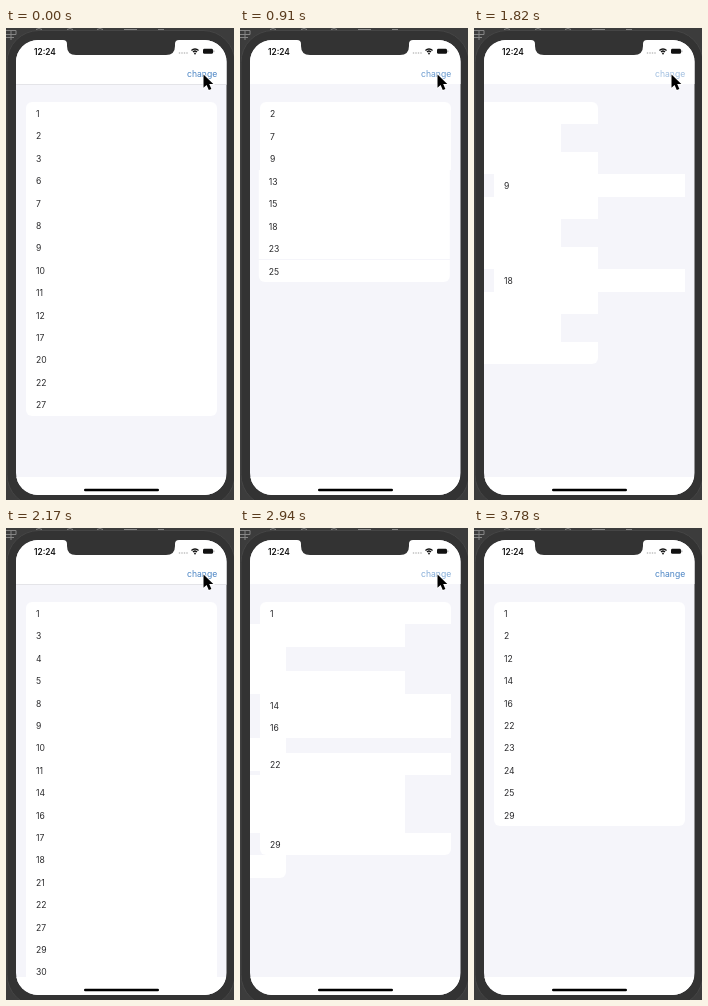
An HTML page with a canvas for the animation above (3850 ms loop, 228 by 472 pixels).

```html
<!DOCTYPE html>
<html lang="en">
<head>
<meta charset="utf-8">
<title>List changes</title>
<style>
html, body { margin: 0; width: 100%; height: 100%; overflow: hidden; background: #3c3c3c; }
canvas { display: block; }
</style>
</head>
<body>
<canvas id="stage" width="228" height="472"></canvas>
<script>
const ctx = document.getElementById('stage').getContext('2d');
const LOOP = 3850, STEP = 70, ROW = 22.4, TOP = 74, SLIDE = 211;
const FONT = '8.6px Inter, sans-serif';

const lists = [
  [1, 2, 3, 6, 7, 8, 9, 10, 11, 12, 17, 20, 22, 27],
  [2, 7, 9, 13, 15, 18, 23, 25],
  [1, 3, 4, 5, 8, 9, 10, 11, 14, 16, 17, 18, 21, 22, 27, 29, 30],
  [1, 2, 12, 14, 16, 22, 23, 24, 25, 29],
];
const clicks = [
  { press: 350, release: 630 },
  { press: 1470, release: 1680 },
  { press: 2450, release: 2730 },
];

const clamp = v => Math.min(1, Math.max(0, v));
const smooth = u => u * u * (3 - 2 * u);
const mix = (a, b, p) => a + (b - a) * p;

// Rows of a run, each paired with its place in the matching run of the other list.
const spread = (list, start, end, otherStart, otherEnd) =>
  list.slice(start, end).map((n, k) => ({
    n, list, own: start + k,
    other: otherStart + k / Math.max(1, end - start - 1) * Math.max(0, otherEnd - otherStart - 1),
  }));

function plan(before, after) {
  const added = [], removed = [], kept = [];
  let i = 0, j = 0;
  for (const n of [...before.filter(v => after.includes(v)), null]) {
    const a = n === null ? before.length : before.indexOf(n);
    const b = n === null ? after.length : after.indexOf(n);
    removed.push(...spread(before, i, a, j, b));
    added.push(...spread(after, j, b, i, a));
    if (n !== null) kept.push({ n, list: after, own: b, other: a });
    i = a + 1;
    j = b + 1;
  }
  return { added, removed, kept };
}
const plans = clicks.map((_, k) => plan(lists[k], lists[k + 1]));

function box(x, y, w, h, r, fill) {
  ctx.beginPath();
  ctx.roundRect(x, y, w, h, r);
  ctx.fillStyle = fill;
  ctx.fill();
}

function disc(x, y, r, fill, stroke, width) {
  ctx.beginPath();
  ctx.arc(x, y, r, 0, 7);
  if (fill) { ctx.fillStyle = fill; ctx.fill(); }
  if (stroke) { ctx.strokeStyle = stroke; ctx.lineWidth = width; ctx.stroke(); }
}

function text(s, x, y, fill, font = FONT) {
  ctx.font = font;
  ctx.fillStyle = fill;
  ctx.fillText(s, x, y);
}

function drawRow({ n, list, own }, place, dx) {
  const y = TOP + place * ROW, top = Math.round(y);
  const head = own === 0 ? 6 : 0, foot = own === list.length - 1 ? 6 : 0;
  box(20 + dx, top, 191, Math.round(y + ROW) - top, [head, head, foot, foot], '#fff');
  text(n, 30 + dx, Math.round(y + 15), '#2a2a2c');
}

function drawList(t) {
  const k = clicks.findLastIndex(c => t > c.release);
  if (k < 0) return lists[0].forEach((n, own) => drawRow({ n, list: lists[0], own }, own, 0));
  const p = smooth(clamp((t - clicks[k].release - 20) / 272));
  const { added, removed, kept } = plans[k];
  for (const r of added) drawRow(r, mix(r.other, r.own, p), -SLIDE * (1 - p));
  if (p < 1) for (const r of removed) drawRow(r, mix(r.own, r.other, p), -SLIDE * p);
  for (const r of kept) drawRow(r, mix(r.other, r.own, p), 0);
}

function drawBody() {
  ctx.fillStyle = '#3c3c3c';
  ctx.fillRect(0, 0, 228, 472);
  ctx.strokeStyle = '#858585';
  ctx.lineWidth = 1;
  ctx.stroke(new Path2D('M0 2.5H10V6.5H0M5 2V12M0 9.5H8M30 1.5l3-1 3 1M61 1.5l3-1 3 1M91 1.5l3-1 3 1M118 1.5h13M152 1.5h6'));
  box(1, 2.5, 228, 476, 32, '#333');
  ctx.strokeStyle = '#454545';
  ctx.stroke();
}

function drawStatus() {
  ctx.fillStyle = '#333';
  ctx.fill(new Path2D('M57 11V12Q61 12 61 16V18Q61 27 70 27H160Q169 27 169 18V16Q169 12 173 12V11Z'));
  text('12:24', 28, 26.5, '#111', '600 8.3px Inter, sans-serif');
  for (let i = 0; i < 4; i++) disc(173.5 + i * 2.5, 25, 0.8, '#b5b5b5');
  ctx.strokeStyle = '#111';
  ctx.lineWidth = 1.3;
  for (const r of [2.8, 5]) {
    ctx.beginPath();
    ctx.arc(189, 26, r, -2.36, -0.78);
    ctx.stroke();
  }
  disc(189, 25.5, 0.9, '#111');
  box(197, 20.8, 10, 5, 1.4, '#111');
  box(207.4, 22.3, 0.9, 2, 0.4, '#888');
}

function drawButton(t) {
  let alpha = 1;
  for (const { press, release } of clicks)
    if (t >= press) alpha = 0.2 + 0.8 * clamp((t - release) / 350);
  ctx.globalAlpha = alpha;
  text('change', 181, 48.5, '#4a84c4');
  ctx.globalAlpha = 1;
}

function drawPointer(t) {
  const click = clicks.find(c => t >= c.press && t < c.release);
  if (click) {
    const grow = clamp((t - click.press) / 140);
    disc(197, 47, 10.5, 'rgba(205,205,205,.8)', '#b4b4b4', 1);
    disc(197, 47, mix(11, 21.7, grow), null, '#111', 1.5);
  }
  if (t >= 3780) return;
  const u = clamp((t - 3220) / 490) ** 1.6;
  ctx.save();
  ctx.translate(mix(197.5, 132.5, u), mix(46.5, 464, u));
  const arrow = new Path2D('M0 0V13.2L3.1 10.4L5.3 15.6L7.9 14.5L5.7 9.5H9.8Z');
  ctx.strokeStyle = '#fff';
  ctx.lineWidth = 1.4;
  ctx.stroke(arrow);
  ctx.fillStyle = '#000';
  ctx.fill(arrow);
  ctx.restore();
}

function draw(t) {
  drawBody();
  ctx.save();
  box(10, 12, 210.5, 455, 22, '#f5f5fa');
  ctx.clip();
  drawList(t);
  ctx.fillStyle = '#fff';
  ctx.fillRect(10, 12, 211, 44);
  ctx.fillRect(10, 449, 211, 18);
  const settled = t <= 630 || (t >= 1960 && t <= 2730);
  if (settled) {
    ctx.fillStyle = '#e4e4e8';
    ctx.fillRect(10, 56, 211, 1);
  }
  ctx.restore();
  drawStatus();
  drawButton(t);
  box(78, 460.7, 75, 2.6, 1.3, '#000');
  drawPointer(t);
}

const start = performance.now();
function tick() {
  const t = (performance.now() - start) % LOOP;
  draw(Math.floor(t / STEP) * STEP);
  requestAnimationFrame(tick);
}
tick();
</script>
</body>
</html>
```
